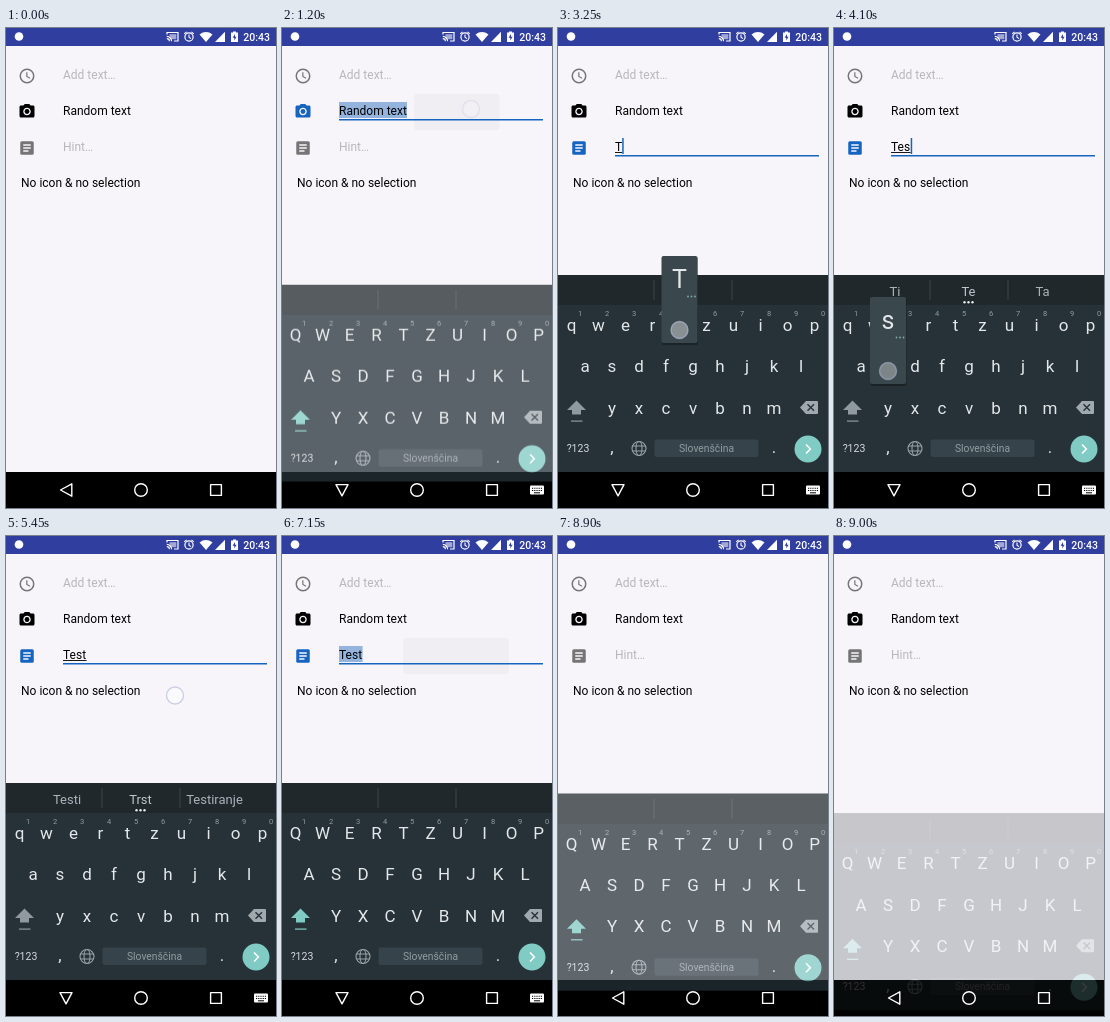
An HTML page for the animation above (9050 ms loop, 270 by 480 pixels).

```html
<!DOCTYPE html>
<html lang="en">
<head>
<meta charset="utf-8">
<title>Text fields</title>
<style>
html, body { margin: 0; width: 100%; height: 100%; overflow: hidden; background: #f7f5fa; }
svg { display: block; width: 270px; height: 480px; font-family: Roboto, "Noto Sans", sans-serif; }
.mid { text-anchor: middle; }
</style>
</head>
<body>
<svg id="stage" viewBox="0 0 270 480"></svg>
<script>
const NS = "http://www.w3.org/2000/svg";
const stage = document.getElementById("stage");
const LOOP = 9050, TICK = 50, BLUE = "#1565c0", GREY = "#757575", BG = "#f7f5fa", KEY = "#e3e7e9";

function set(el, attrs) {
  for (const k in attrs) el.setAttribute(k, attrs[k]);
  return el;
}
function add(parent, tag, attrs) {
  return parent.appendChild(set(document.createElementNS(NS, tag), attrs || {}));
}
function rect(p, x, y, width, height, fill, rx = 0) {
  return add(p, "rect", { x, y, width, height, fill, rx });
}
function circle(p, cx, cy, r, attrs) {
  return add(p, "circle", { cx, cy, r, ...attrs });
}
function path(p, d, attrs) {
  return add(p, "path", { d, ...attrs });
}
function text(p, x, y, size, fill, str, cls = "") {
  const el = add(p, "text", { x, y, "font-size": size, fill, class: cls });
  el.textContent = str;
  return el;
}
function line(color, width = 1) {
  return { fill: "none", stroke: color, "stroke-width": width };
}
function show(el, on) {
  el.setAttribute("visibility", on ? "visible" : "hidden");
}

// Page
rect(stage, 0, 0, 270, 480, BG);
rect(stage, 0, 0, 270, 18, "#303f9f");
rect(stage, 0, 444, 270, 36, "#000");

// Status bar
const bar = add(stage, "g");
circle(bar, 13, 8.5, 4.3, { fill: "#fff" });
path(bar, "M161 6.5V4.5H172V13H168", line("#fff", 1.2));
path(bar, "M160.8 8.4A4.8 4.8 0 0 1 165.6 13.2M160.8 10.6A2.6 2.6 0 0 1 163.4 13.2", line("#fff", 1.1));
rect(bar, 163.5, 6.2, 6.8, 5, "#fff").setAttribute("opacity", .55);
circle(bar, 183, 9, 4.1, line("#fff", 1.2));
path(bar, "M183 6.5V9.3L185 10.6M178.2 5.8L180.6 3.8M187.8 5.8L185.4 3.8", line("#fff", 1.1));
path(bar, "M193.5 6.4Q200 1.8 206.5 6.4L200 14Z", { fill: "#fff" });
path(bar, "M219 3.8V14H209Z", { fill: "#fff" });
path(bar, "M225 4.6H227V3.6H230V4.6H232V14H225Z", { fill: "#fff" });
path(bar, "M229 6L226.6 9.8H228.3V12.6L230.6 8.8H229Z", { fill: "#303f9f" });
text(bar, 250.7, 13, 10.5, "#fff", "20:43", "mid").setAttribute("font-weight", 500);

// Fields
const ghost = rect(stage, 121, 66, 106, 36, "#f0eef2", 3);
const mark = rect(stage, 57, 74, 68, 16, "#94b4de");
const rule = rect(stage, 57, 91, 204, 1.5, BLUE);

function icon(y) {
  return add(stage, "g", { transform: `translate(12 ${y}) scale(.75)`, fill: GREY });
}
const clock = icon(39);
circle(clock, 12, 12, 9, line(GREY, 2));
path(clock, "M11.8 7V12.6L16 15.1", line(GREY, 1.6));
const camera = icon(74.5);
path(camera, "M9 2 7.17 4H4c-1.1 0-2 .9-2 2v12c0 1.1.9 2 2 2h16c1.1 0 2-.9 2-2V6c0-1.1-.9-2-2-2h-3.17L15 2H9zm3 15c-2.76 0-5-2.24-5-5s2.24-5 5-5 5 2.24 5 5-2.24 5-5 5z");
circle(camera, 12, 12, 3.2);
const note = icon(111);
add(note, "rect", { x: 3, y: 3, width: 18, height: 18, rx: 2 });
path(note, "M7 8H17M7 12H17M7 16H14", line(BG, 2));

text(stage, 57, 50.5, 12, "#b8b7ba", "Add text…");
text(stage, 57, 86.5, 12, "#000", "Random text");
const hint = text(stage, 57, 122.5, 12, "#b8b7ba", "Hint…");
const typed = text(stage, 57, 122.5, 12, "#000", "");
text(stage, 15, 158.5, 12, "#000", "No icon & no selection");
const compose = rect(stage, 57, 124, 8, .9, "#000");
const caret = rect(stage, 57, 110, 1.5, 16, BLUE);

// Keyboard
const board = add(stage, "g");
rect(board, 0, 247, 270, 197, "#263238");
rect(board, 0, 247, 270, 30, "#20282c");
rect(board, 95.5, 252, 1, 20, "#3a454b");
rect(board, 173.5, 252, 1, 20, "#3a454b");
const words = [61, 134.5, 208.5].map((x, i) =>
  text(board, x, 267.5, 13, i === 1 ? "#bcc6cb" : "#a9b4ba", "", "mid"));
const dots = add(board, "g");
for (const x of [130.5, 134.5, 138.5]) circle(dots, x, 274.3, 1.2, { fill: "#e8ecee" });

const letters = [];
[["QWERTZUIOP", 13.5, 303], ["ASDFGHJKL", 27, 344.3], ["YXCVBNM", 54, 385.5]].forEach(([row, x, y]) =>
  [...row].forEach((c, i) => letters.push([text(board, x + 27 * i, y, 17, KEY, c, "mid"), c])));
[..."1234567890"].forEach((c, i) => text(board, 22 + 27 * i, 288, 7.5, "#929da2", c, "mid"));

const shift = add(board, "g");
path(shift, "M18.5 372.5L28 382H23V386.5H14V382H9Z");
rect(shift, 13, 392.5, 11.5, 1.2);
for (const el of shift.children) el.removeAttribute("fill");

const press = rect(board, 235, 364, 33, 31, "#37444a", 2);
path(board, "M248 373H259Q260 373 260 374V385Q260 386 259 386H248L242 379.5Z", { fill: "#a0a9ad" });
path(board, "M249.5 376.3L256 382.8M256 376.3L249.5 382.8", line("#263238", 1.4));

text(board, 20, 424, 10.5, "#d5dadd", "?123", "mid");
text(board, 54, 425, 17, KEY, ",", "mid");
text(board, 216, 425, 17, KEY, ".", "mid");
const globe = add(board, "g", line("#97a2a7", 1.1));
circle(globe, 81, 420.5, 7);
add(globe, "ellipse", { cx: 81, cy: 420.5, rx: 3, ry: 7 });
path(globe, "M74.5 418H87.5M74.5 423H87.5");
rect(board, 96.5, 411.5, 104, 17.5, "#37434a", 2.5);
text(board, 148.5, 424, 10.3, "#929da2", "Slovenščina", "mid");
circle(board, 250, 421, 13.5, { fill: "#80cbc4" });
path(board, "M248 416.5L252.3 421L248 425.5", line("#fff", 1.6));

const pop = add(board, "g");
rect(pop, -17.5, -73, 36, 88, "#000", 2).setAttribute("opacity", .3);
rect(pop, -18, -74, 36, 87, "#3a474d", 2);
const popText = text(pop, 0, -42.5, 25, KEY, "", "mid");
for (const x of [8.5, 12, 15.5]) circle(pop, x, -33.5, .9, { fill: "#80a9a8" });

// Navigation
const nav = add(stage, "g", { ...line("#fff", 1.4), "stroke-linejoin": "round" });
const back = path(nav, "M54.5 462L65.8 455.8V468.2Z");
const down = path(nav, "M54 456.6H66L60 467.8Z");
circle(nav, 135, 462, 6.3);
path(nav, "M204.6 456.6H215.4V467.4H204.6Z");
const ime = add(stage, "g");
rect(ime, 248, 457.5, 14, 9, "#fff", 1);
path(ime, "M250 460.3H260M250 462.5H260", { ...line("#000", 1.1), "stroke-dasharray": "1.2 1" });
path(ime, "M252 464.8H258", line("#000", 1));

const finger = circle(stage, 0, 0, 8.5, {
  fill: "#fff", "fill-opacity": .4, stroke: "#b4bcd8", "stroke-opacity": .65, "stroke-width": 1.4
});

// Timeline: [start, value]
const focusAt = [[0, 0], [1150, 2], [2450, 3], [5650, 4], [7050, 3], [8800, 0]];
const textAt = [[0, ""], [3250, "T"], [3650, "Te"], [4050, "Tes"], [4550, "Test"], [8050, ""]];
const wordsAt = [[0, ""], [3400, "To T Ta"], [3750, "Ti Te Ta"], [4200, "Test Tes Tesen"],
  [4650, "Testi Trst Testiranje"], [5700, ""]];
const capsAt = [[0, true], [3250, false], [7100, true]];
const caretAt = [[0, false], [2450, true], [2950, false], [3250, true], [5050, false],
  [5650, true], [6150, false], [6650, true], [7050, false], [8050, true], [8550, false]];
const taps = [[1050, 189, 81], [2400, 150, 118], [3200, 121.5, 302, "T"], [3600, 67.5, 302, "e"],
  [4000, 54, 343, "s"], [4500, 121.5, 302, "t"], [5450, 169, 159.5], [6950, 130, 118],
  [8000, 251, 380], [8700, 60, 460]];
const fade = [1, 1, .85, .4];
const advance = { "": 0, T: 7.2, Te: 13.5, Tes: 19.7, Test: 23.6 };

function at(list, t) {
  let v = list[0][1];
  for (const [start, value] of list) if (t >= start) v = value;
  return v;
}
function boardAlpha(t) {
  if (t < 1100) return 0;
  if (t < 1300) return 1 - (1 - (t - 1100) / 200) ** 2;
  if (t <= 8800) return 1;
  return Math.max(0, 1 - ((t - 8800) / 237) ** 1.5);
}

function render(t) {
  const focus = at(focusAt, t), str = at(textAt, t), caps = at(capsAt, t);
  const selA = focus === 2, selB = t >= 7050 && t < 8050;

  // Fields
  camera.setAttribute("fill", focus === 2 ? BLUE : "#000");
  note.setAttribute("fill", focus === 3 ? BLUE : str ? "#000" : GREY);
  show(hint, !str);
  typed.textContent = str;
  show(rule, focus);
  const left = focus === 4 ? 15 : 57;
  set(rule, { x: left, width: 261 - left, y: 91 + 36 * (focus - 2) });
  show(mark, selA || selB);
  set(mark, { y: selB ? 110 : 74, width: selB ? 23.6 : 68 });
  show(ghost, t >= (selB ? 7100 : 1200) && (selA || selB));
  const small = t === 1200 || t === 7100;
  set(ghost, { x: small ? 132 : 121, width: small ? 85.5 : 106, y: selB ? 102 : 66 });
  show(compose, str && t < 5650);
  compose.setAttribute("width", advance[str]);
  show(caret, at(caretAt, t));
  set(caret, focus === 4 ? { x: 133, y: 146 } : { x: 57 + advance[str], y: 110 });

  // Keyboard
  const a = boardAlpha(t);
  show(board, a > 0);
  set(board, { opacity: a, transform: `translate(0 ${39 * (1 - a)})` });
  for (const [el, c] of letters) el.textContent = caps ? c : c.toLowerCase();
  shift.setAttribute("fill", caps ? "#80cbc4" : "#8f999e");
  const list = at(wordsAt, t).split(" ");
  words.forEach((el, i) => el.textContent = list[i] || "");
  dots.setAttribute("opacity", list[0] ? 1 : 0);
  press.setAttribute("opacity", t >= 8000 && t < 8150 ? 1 : 0);

  const open = t >= 1150 && t < 8850;
  show(down, open);
  show(ime, open);
  show(back, !open);

  // Touches
  const tap = taps.find(p => t >= p[0] && t < p[0] + 200);
  const age = tap ? (t - tap[0]) / TICK : 4;
  finger.setAttribute("opacity", fade[age] || 0);
  pop.setAttribute("opacity", tap && tap[3] && age < 3 ? 1 : 0);
  if (tap) {
    set(finger, { cx: tap[1], cy: tap[2] });
    pop.setAttribute("transform", `translate(${tap[1]} ${tap[2]})`);
    popText.textContent = tap[3] || "";
  }
}

const begin = performance.now();
function loop() {
  const t = (performance.now() - begin) % LOOP;
  render(Math.floor(t / TICK) * TICK);
  requestAnimationFrame(loop);
}
loop();
</script>
</body>
</html>
```
